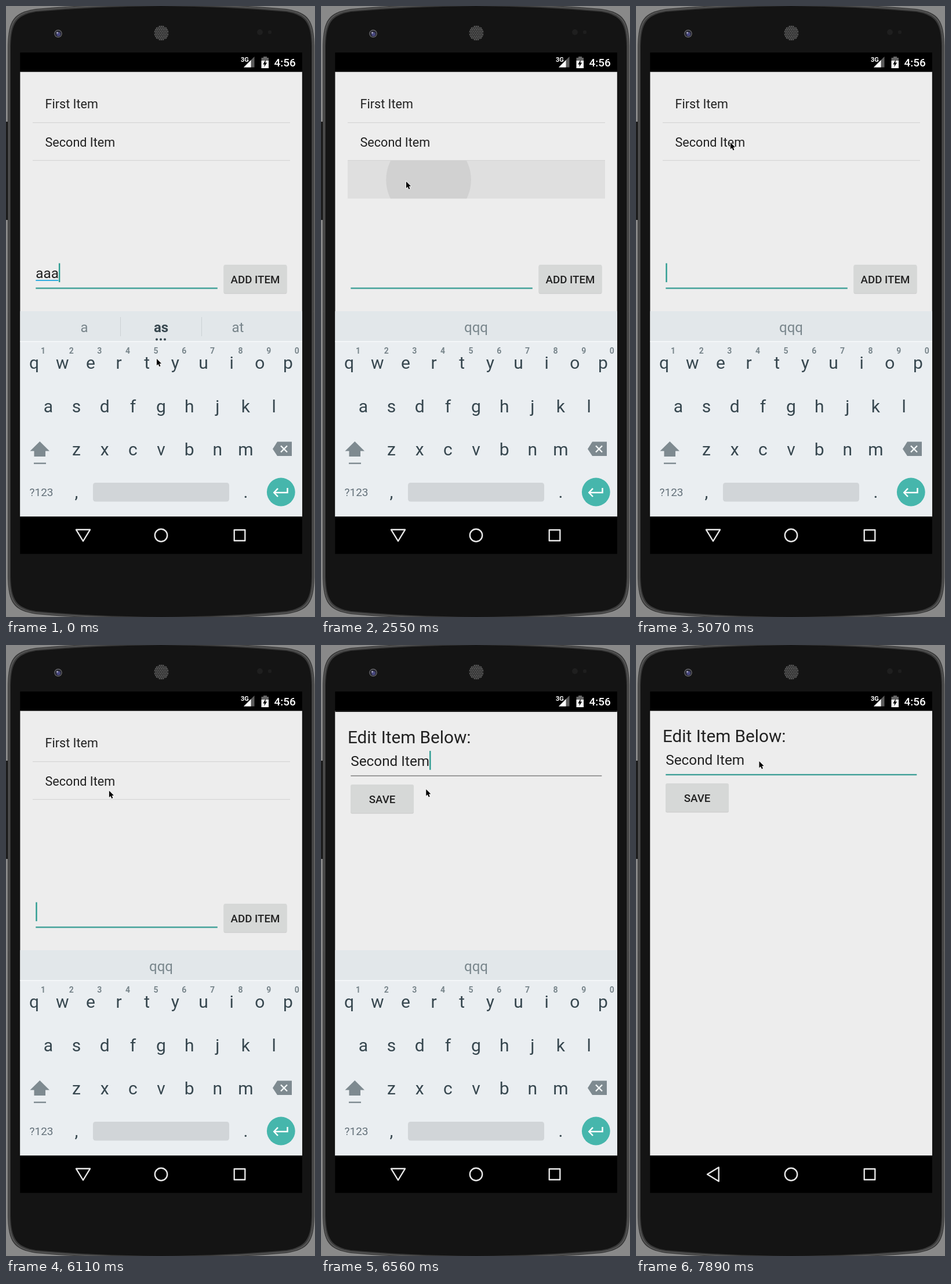
An HTML page with a canvas that plays this animation: 533 px wide and 1051 px high, repeating every 8000 ms.

```html
<!DOCTYPE html>
<html lang="en">
<head>
<meta charset="utf-8">
<title>List editor on a phone</title>
<style>
html, body { margin: 0; width: 100%; height: 100%; overflow: hidden; background: #898989; }
canvas { display: block; width: 533px; height: 1051px; }
</style>
</head>
<body>
<canvas></canvas>
<script>
const W = 533, H = 1051, LOOP = 8000;
const LEFT = 24.4, WIDE = 486.4, TOP = 113.2, BOTTOM = 878.3;
const TEAL = '#3fa097', INK = '#212121', PAPER = '#ededed', KEY = '#37474f';
const ICON = '#7e8a90', HINT = '#78858b';

// Moments of the story, in ms
const BLUR = 440, PRESS = 763, ADD = 1060, HOLD = 2095, REMOVE = 2540, RELEASE = 2700;
const OPEN = 6376, READY = 6700;

const canvas = document.querySelector('canvas');
const c = canvas.getContext('2d');
const dpr = window.devicePixelRatio || 1;
canvas.width = W * dpr;
canvas.height = H * dpr;

const clamp = v => Math.max(0, Math.min(1, v));
const mix = (a, b, k) => a + (b - a) * k;
const ease = k => k * k * (3 - 2 * k);

// The screen refreshes at a steady low rate.
const snap = t => Math.max(0, Math.floor((t - 21) / 148.45) * 148.45 + 21);

// Pointer stops: time, x, y
const STOPS = [[0, 260, 607], [BLUR, 413, 472], [ADD, 413, 472], [1357, 147, 318],
  [1800, 147, 302], [2700, 147, 302], [3590, 106, 778], [3880, 115, 709], [4320, 397, 390],
  [4720, 260, 120], [5068, 163, 235], [6400, 180, 253], [READY, 182.5, 244],
  [6850, 182.5, 244], [7450, 126, 789], [7880, 212.5, 200]];

function pointerAt(t) {
  const i = STOPS.findLastIndex(s => s[0] <= t);
  const [ta, xa, ya] = STOPS[i], [tb, xb, yb] = STOPS[i + 1] || [LOOP, xa, ya];
  const k = ease((t - ta) / (tb - ta));
  return [mix(xa, xb, k), mix(ya, yb, k)];
}

function rect(x, y, w, h, fill) {
  c.fillStyle = fill;
  c.fillRect(x, y, w, h);
}

function round(x, y, w, h, r, fill) {
  c.beginPath();
  c.roundRect(x, y, w, h, r);
  c.fillStyle = fill;
  c.fill();
}

function disc(x, y, r, fill) {
  c.beginPath();
  c.arc(x, y, r, 0, 7);
  c.fillStyle = fill;
  c.fill();
}

function trace(pts, close) {
  c.beginPath();
  for (let i = 0; i < pts.length; i += 2) c.lineTo(pts[i], pts[i + 1]);
  if (close) c.closePath();
}

function poly(fill, ...pts) {
  trace(pts, true);
  c.fillStyle = fill;
  c.fill();
}

function line(color, width, ...pts) {
  trace(pts, false);
  c.strokeStyle = color;
  c.lineWidth = width;
  c.stroke();
}

function text(s, x, y, size, color = INK, align = 'left', weight = 400) {
  c.font = `${weight} ${size}px Roboto, sans-serif`;
  c.textAlign = align;
  c.fillStyle = color;
  c.fillText(s, x, y);
}

// One quarter of the case, mirrored both ways
function shell(inset, fill) {
  const x = inset - 264.5, y = inset - 525.5;
  c.fillStyle = fill;
  for (const sx of [1, -1])
    for (const sy of [1, -1]) {
      c.save();
      c.translate(267.5, 525.5);
      c.scale(sx, sy);
      c.beginPath();
      c.moveTo(1, 1);
      c.lineTo(x, 1);
      c.lineTo(x, -456);
      c.bezierCurveTo(x + 1, y + 24, x + 10, y + 11, -216, y + 5);
      c.quadraticCurveTo(-117, y - 4, 1, y - 5);
      c.fill();
      c.restore();
    }
}

function phone() {
  rect(0, 0, W, H, '#898989');
  rect(0, 199, 5, 169, '#1c1c1c');
  shell(0, '#343434');
  shell(1.2, '#565656');
  shell(3, '#3a3a3a');
  shell(5, '#141414');

  disc(90, 47.5, 6.8, '#6c6c70');
  disc(90, 47.5, 5.6, '#24242f');
  disc(90.5, 48.5, 3.4, '#494980');
  disc(88.5, 46, 1.6, '#a8a8c0');
  disc(268, 46.5, 13, '#262626');
  for (let j = -4; j <= 4; j++)
    for (let i = -4; i <= 4; i++) {
      const x = (i + (j & 1) / 2) * 3.1, y = j * 2.8;
      if (Math.hypot(x, y) < 12) disc(268 + x, 46.5 + y, 1.05, '#717171');
    }
  disc(438, 45, 5, '#1f1f1f');
  disc(455, 45, 3.2, '#1e1e1e');
}

function statusBar() {
  rect(LEFT, 80, WIDE, TOP - 80, '#000');
  text('3G', 405, 95.5, 11, '#fff', 'left', 700);
  poly('#5c5c5c', 410, 105.5, 428.5, 105.5, 428.5, 87);
  poly('#fff', 410, 105.5, 422.5, 105.5, 422.5, 93);
  rect(444, 87, 6, 3, '#666');
  rect(440.5, 89, 12.5, 5, '#666');
  rect(440.5, 94, 12.5, 13, '#fff');
  poly('#000', 448, 92, 443.3, 100.5, 446, 100.5, 445.3, 105, 450.2, 97.5, 447.4, 97.5);
  text('4:56', 462.5, 104, 18.9, '#fff', 'left', 500);
}

function navBar(keyboardUp) {
  rect(LEFT, BOTTOM, WIDE, 942.5 - BOTTOM, '#000');
  c.strokeStyle = '#e6e6e6';
  c.lineWidth = 2.4;
  c.lineJoin = 'round';
  c.save();
  c.translate(133, 910.5);
  if (!keyboardUp) c.rotate(Math.PI / 2);
  trace([-12, -9.7, 12, -9.7, 0, 10], true);
  c.stroke();
  c.restore();
  c.beginPath();
  c.arc(267.5, 910.5, 10.7, 0, 7);
  c.stroke();
  c.strokeRect(393.7, 901.2, 18.6, 18.6);
  c.lineJoin = 'miter';
}

function button(label, x, y, dark = 0) {
  round(x, y + 1.2, 109, 49, 3, 'rgba(0,0,0,.13)');
  round(x, y, 109, 49, 3, '#d6d8d7');
  if (dark) round(x, y, 109, 49, 3, `rgba(0,0,0,${dark})`);
  text(label, x + 54.5, y + 31.5, 18.7, INK, 'center', 500);
}

function field(s, y, width, focused, caretOn) {
  const x = 51.3;
  text(s, x, y, 24.3);
  if (focused) rect(x, y + 16.1, width, 2.4, TEAL);
  else rect(x, y + 16.5, width, 1.5, '#808080');
  if (caretOn) rect(x + c.measureText(s).width, y - 25.7, 2.4, 32.6, '#2b9c91');
}

function ripple(t) {
  const grow = Math.min(1, (t - HOLD) / 1400);
  const fade = clamp(.25 + (t - HOLD) / 600) * clamp(1 - (t - RELEASE) / 500);
  if (t < HOLD || !fade) return;
  c.save();
  c.beginPath();
  c.rect(46, 266, 444, 65.5);
  c.clip();
  rect(46, 266, 444, 65.5, `rgba(0,0,0,${.057 * fade})`);
  disc(mix(147, 267, grow), 299, 2 + 222 * grow, `rgba(0,0,0,${.063 * fade})`);
  c.restore();
}

function listPage(t) {
  const added = t >= ADD, items = ['First Item', 'Second Item'];
  rect(LEFT, TOP, WIDE, BOTTOM - TOP, PAPER);
  if (added && t < REMOVE) items.push('aaa');
  ripple(t);
  items.forEach((s, i) => {
    const y = 176 + i * 65.7;
    text(s, 67.5, y, 21.6);
    rect(46, Math.round(y + 23.5), 444, 1.2, '#d5d5d5');
  });

  const blink = added ? t >= HOLD && t < OPEN && (t - 2020) % 1000 < 500 : t < BLUR;
  if (!added) rect(51.3, 471, 39, 2, '#35aee0');
  field(added ? '' : 'aaa', 468.2, 313.5, true, blink);
  button('ADD ITEM', 375.5, 445, t < PRESS ? 0 : .1 * clamp((1360 - t) / 300));
}

function editPage(t) {
  const age = t - OPEN;
  if (age < 0) return;
  c.save();
  c.beginPath();
  c.rect(LEFT, TOP, WIDE, BOTTOM - TOP);
  c.clip();
  c.translate(0, 68 * (1 - clamp(age / 350)) ** 5);
  c.globalAlpha = 1 - (1 - clamp(age / 210)) ** 4;
  rect(LEFT, 80, WIDE, TOP - 80, '#000');
  rect(LEFT, TOP, WIDE, BOTTOM - TOP, PAPER);
  text('Edit Item Below:', 46, 166.7, 29.7);
  field('Second Item', 205.8, 433, t >= READY, age % 1000 < 470);
  button('SAVE', 51, 238);
  c.restore();
}

function suggestions(t) {
  rect(LEFT, 525, WIDE, 52, '#e2e7ea');
  if (t >= ADD) return text('qqq', 267.5, 560.5, 24, HINT, 'center');
  ['a', 'as', 'at'].forEach((word, i) => {
    const best = i === 1;
    text(word, 135 + i * 132.5, 560.5, 24, best ? KEY : HINT, 'center', best ? 700 : 400);
  });
  for (const side of [-1, 1]) rect(267 + side * 70, 535, 1, 33, '#cbd1d4');
  for (const side of [-1, 0, 1]) disc(267 + side * 7, 573.5, 2, KEY);
}

function keyboard(t) {
  const pitch = 48.65, mid = 267.5;
  suggestions(t);
  rect(LEFT, 576.5, WIDE, BOTTOM - 576.5, '#eaeef1');
  rect(LEFT, 576.5, WIDE, 1.5, '#f8fafb');
  ['qwertyuiop', 'asdfghjkl', 'zxcvbnm'].forEach((row, j) => {
    [...row].forEach((ch, i) =>
      text(ch, mid + (i - (row.length - 1) / 2) * pitch, 624 + j * 74.5, 30, KEY, 'center'));
  });
  for (let i = 0; i < 10; i++)
    text((i + 1) % 10, 64 + i * pitch, 598, 14, HINT, 'center', 700);

  poly(ICON, 58.3, 749, 75, 765.5, 41.5, 765.5);
  rect(48.5, 765, 19.5, 10, ICON);
  rect(48, 785.5, 21, 2.4, ICON);
  poly(ICON, 460, 762, 468, 749.5, 493, 749.5, 493, 774, 468, 774);
  for (const d of [-5.5, 5.5]) line('#f2f5f6', 2.4, 479.5 - d, 756.5, 479.5 + d, 767.5);

  text('?123', 61, 843, 19, '#64717a', 'center');
  text(',', mid - 3 * pitch, 846, 30, KEY, 'center');
  text('.', mid + 3 * pitch, 846, 30, KEY, 'center');
  round(150, 820, 235, 32.5, 4.5, '#d1d5d8');
  disc(474.3, 836, 24.4, '#46b6ac');
  line('#fff', 2.5, 485.5, 829, 485.5, 837, 463, 837);
  line('#fff', 2.5, 469, 829.8, 462.3, 837, 469, 844);
}

function pointer([x, y]) {
  c.save();
  c.translate(x, y);
  trace([0, 0, 0, 11.2, 2.6, 8.9, 4.5, 13.2, 6.4, 12.3, 4.6, 8.2, 8, 8], true);
  c.strokeStyle = '#f5f5f5';
  c.lineWidth = 1.6;
  c.stroke();
  c.fillStyle = '#000';
  c.fill();
  c.restore();
}

function draw(now) {
  const t = snap(now % LOOP), keyboardUp = t < READY;
  c.setTransform(dpr, 0, 0, dpr, 0, 0);
  phone();
  listPage(t);
  editPage(t);
  if (keyboardUp) keyboard(t);
  statusBar();
  navBar(keyboardUp);
  pointer(pointerAt(t));
}

let start;
function loop(now) {
  start ??= now;
  draw(now - start);
  requestAnimationFrame(loop);
}
draw(0);
requestAnimationFrame(loop);
</script>
</body>
</html>
```
